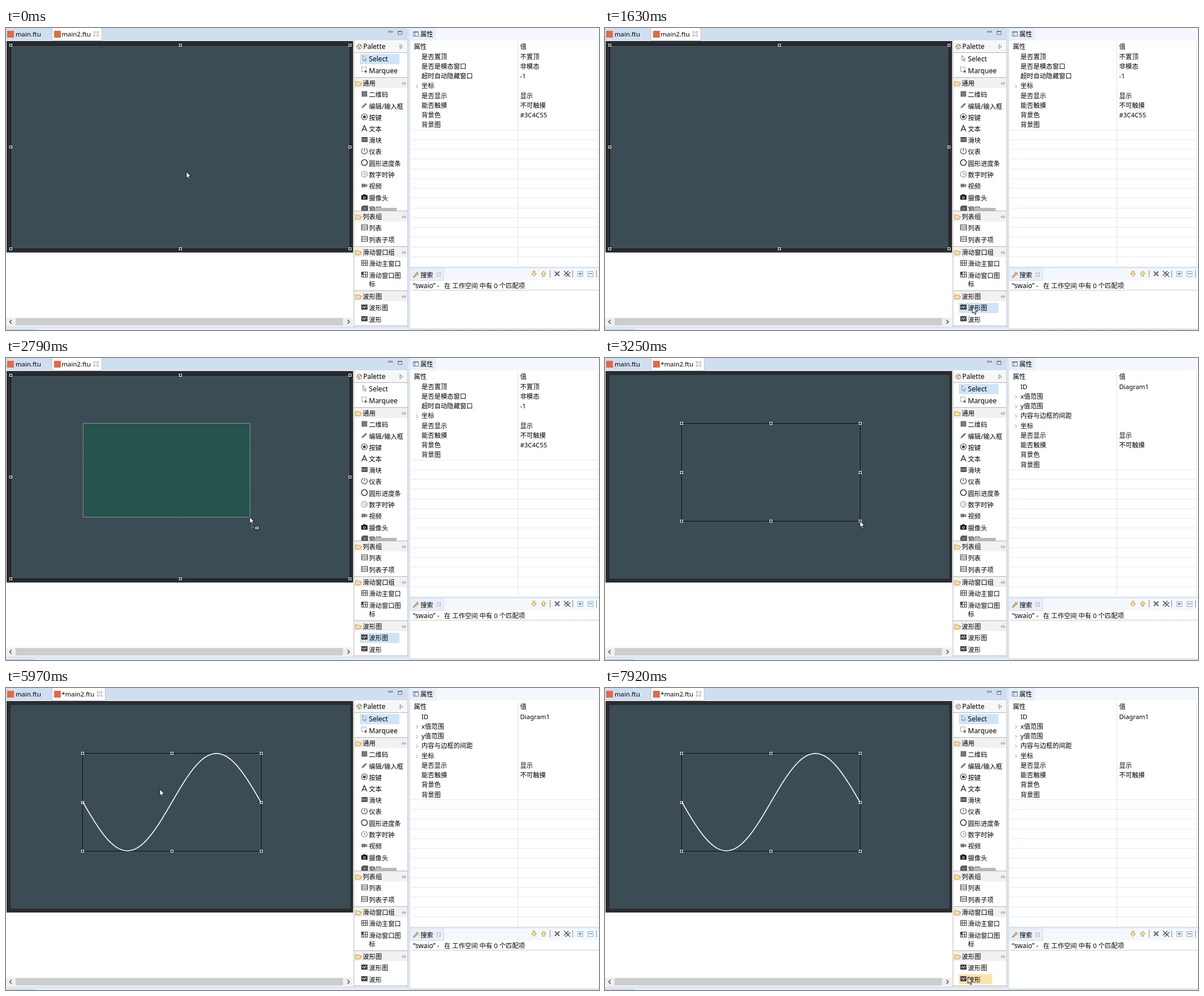
Write an HTML page with a canvas that moves like this. It is 1049 px wide and 534 px high and loops after 7990 ms.

```html
<!DOCTYPE html>
<html lang="zh">
<head>
<meta charset="utf-8">
<style>
html, body { margin: 0; width: 100%; height: 100%; overflow: hidden; background: #fff; }
canvas { display: block; }
</style>
</head>
<body>
<canvas id="stage" width="1049" height="534"></canvas>
<script>
const ctx = document.getElementById('stage').getContext('2d');
const LOOP = 7990;
const FAMILY = '"Noto Sans", "Noto Sans CJK SC", "Noto Sans CJK", sans-serif';
const BLUE = '#cfe4fa', ORANGE = '#fde2ae', INK = '#3c3c3c';
const HEADER = '#f4f8fe', TAB = '#e8eff9';

// Pointer moves: start, end, steps, target x, target y
const START = [319, 254];
const MOVES = [
  [360, 1140, 13, 627, 471],
  [1190, 1380, 4, 650, 493],
  [1695, 2410, 12, 136, 116],
  [2480, 2790, 6, 431, 281],
  [2855, 3000, 3, 451, 288],
  [3675, 4390, 11, 648, 519],
  [4460, 4580, 3, 652, 516],
  [5270, 5720, 8, 272, 179],
  [7280, 7790, 9, 600, 507],
  [7855, 7920, 2, 642, 511]
];
const DRAG = MOVES[3];

const smooth = s => s * s * (3 - 2 * s);
const easeOut = s => 1 - (1 - s) ** 2;

function pointerAt(t) {
  let [x, y] = START;
  for (const move of MOVES) {
    const [start, end, steps, toX, toY] = move;
    if (t < start) break;
    const k = Math.min(steps - 1, Math.floor((t - start) / (end - start) * (steps - 1) + 0.3));
    const s = (move === DRAG ? easeOut : smooth)((k + 1) / steps);
    x += (toX - x) * s;
    y += (toY - y) * s;
  }
  return [Math.round(x), Math.round(y)];
}

function box(x, y, w, h, color) {
  ctx.fillStyle = color;
  ctx.fillRect(x, y, w, h);
}

function frame(x, y, w, h, color, dash = []) {
  ctx.strokeStyle = color;
  ctx.lineWidth = 1;
  ctx.setLineDash(dash);
  ctx.strokeRect(x + 0.5, y + 0.5, w, h);
  ctx.setLineDash([]);
}

// y is the middle of the text row
function text(str, x, y, size = 11.35) {
  ctx.font = `${size}px ${FAMILY}`;
  ctx.fillStyle = '#000';
  ctx.fillText(str, x, y + 4.2);
}

function shape(path, x, y, fill, stroke, width = 1) {
  ctx.save();
  ctx.translate(x, y);
  const p = new Path2D(path);
  if (fill) { ctx.fillStyle = fill; ctx.fill(p); }
  if (stroke) { ctx.strokeStyle = stroke; ctx.lineWidth = width; ctx.stroke(p); }
  ctx.restore();
}

const CIRCLE = r => `M${r} 0A${r} ${r} 0 1 1 ${-r} 0A${r} ${r} 0 1 1 ${r} 0Z`;
const CROSS = 'M-4 -4L4 4M4 -4L-4 4';
const POINTER = 'M0 0V11.6L2.7 9.1L4.6 13.6L6.5 12.8L4.6 8.4H8.1Z';
const LIST = 'M-5 -4.5H5.5V4.5H-5ZM-5 -1.5H5.5M-5 1.5H5.5';
const WINDOW = 'M-5 -4.5H5.5V4.5H-5ZM-5 0H5.5M-2 -4.5V4.5M2 -4.5V4.5';

const DRAWERS = [['通用', 98], ['列表组', 334], ['滑动窗口组', 397], ['波形图', 475]];

// label, row middle, icon strokes, icon fill
const ITEMS = [
  ['二维码', 118, '', 'M-5 -5H5V5H-5Z', '#777'],
  ['编辑/输入框', 138.5, '', 'M-5 5L-4 1.5L2.5 -4.5L4.5 -2.5L-1.8 3.8Z', '#777'],
  ['按键', 158.5, CIRCLE(5.2), CIRCLE(2.6)],
  ['文本', 179, 'M-4.5 5L0 -5L4.5 5M-3 2H3'],
  ['滑块', 199, '', 'M-5 -4.5H5.5V4H-5Z'],
  ['仪表', 219, 'M-2.5 -4.5A5.2 5.2 0 1 0 2.5 -4.5M0 1V-5.5'],
  ['圆形进度条', 239.5, CIRCLE(5.2)],
  ['数字时钟', 260, CIRCLE(5) + 'M0 -3V0L2.5 1.5', '', '#888'],
  ['视频', 280, '', 'M-5 -3H2V-1L5 -3V3L2 1V3H-5Z', '#777'],
  ['摄像头', 300.5, '', 'M-5.5 -3.5H-2.5L-1.5 -5H1.5L2.5 -3.5H5.5V4.5H-5.5Z', '#111'],
  ['列表', 354, LIST],
  ['列表子项', 374.5, LIST],
  ['滑动主窗口', 417, WINDOW],
  ['滑动窗口图', 437.5, WINDOW, 'M-5 -4H-2V0H-5Z'],
  ['波形图', 495, '', 'M-5.5 -4.5H5.5V4.5H-5.5Z'],
  ['波形', 515.5, '', 'M-5.5 -4.5H5.5V4.5H-5.5Z']
];

// Selectable palette rows: x, y, width, height
const ROWS = {
  select: [626, 46, 70, 18],
  diagram: [626, 486, 70, 18],
  wave: [626, 506, 59, 18]
};

const WINDOW_PROPS = [
  ['是否置顶', '不置顶'], ['是否是模态窗口', '非模态'], ['超时自动隐藏窗口', '-1'], ['>坐标', ''],
  ['是否显示', '显示'], ['能否触摸', '不可触摸'], ['背景色', '#3C4C55'], ['背景图', '']
];
const DIAGRAM_PROPS = [
  ['ID', 'Diagram1'], ['>x值范围', ''], ['>y值范围', ''], ['>内容与边框的间距', ''], ['>坐标', ''],
  ['是否显示', '显示'], ['能否触摸', '不可触摸'], ['背景色', ''], ['背景图', '']
];

function drawTabs(edited) {
  box(0, 0, 711, 22, '#d0dff0');
  const right = edited ? 175 : 169;
  ctx.fillStyle = '#fff';
  ctx.beginPath();
  ctx.roundRect(81, 0, right - 81, 22, [3, 3, 0, 0]);
  ctx.fill();
  frame(81, -1, right - 81, 23, '#b9c9dd');
  for (const x of [2, 85]) box(x, 5, 12, 12, '#e26a45');
  text('main.ftu', 17, 11);
  text((edited ? '*' : '') + 'main2.ftu', 98.5, 11);
  shape('M-4 -4H-2L0 -2L2 -4H4V-2L2 0L4 2V4H2L0 2L-2 4H-4V2L-2 0L-4 -2Z', right - 9.5, 10.5, '#fff', '#777', 0.8);
  frame(676, 5, 7, 2, '#777');
  frame(693, 5, 7, 6, '#777');
  box(693, 5, 8, 2, '#777');
}

function selection(x, y, w, h) {
  frame(x, y, w, h, '#0c0f10');
  for (const u of [0, 0.5, 1]) for (const v of [0, 0.5, 1]) {
    if (u === 0.5 && v === 0.5) continue;
    const hx = Math.round(x + w * u), hy = Math.round(y + h * v);
    box(hx - 2, hy - 2, 5, 5, '#fff');
    box(hx - 1, hy - 1, 3, 3, '#222');
  }
}

function drawEditor(t, x, y) {
  box(1, 23, 613, 374, '#2b2c2f');
  box(8, 30, 601, 360, '#3c4c54');
  if (t < 3250) selection(8, 30, 600, 360);
  else selection(135, 115, 316, 173);
  if (t >= DRAG[0] && t < 3250) {
    box(136, 116, x - 136, y - 116, '#26534c');
    frame(136, 115, x - 136, y - 115, '#a9b8b5', [2, 1]);
  }
  if (t >= 5970) {
    ctx.beginPath();
    for (let px = 136; px <= 451; px++) ctx.lineTo(px, 201.8 + 86 * Math.sin((px - 136) / 315 * 2 * Math.PI));
    ctx.strokeStyle = '#fff';
    ctx.lineWidth = 1.6;
    ctx.stroke();
  }
  box(0, 512, 614, 15, '#f0f0f0');
  box(17, 513, 579, 13, '#cdcdcd');
  shape('M2 -3.5L-1.5 0L2 3.5', 8, 519.5, null, '#555', 1.5);
  shape('M-2 -3.5L1.5 0L-2 3.5', 606, 519.5, null, '#555', 1.5);
}

function drawHeader(label, y) {
  box(616, y - 10, 94, 18, '#f1f1f1');
  box(616, y - 11, 94, 1, '#b5b5b5');
  shape('M-4.5 4V-3.5H-1L0 -2H4V-0.5H6L4 4Z', 623, y, '#fbe3a0', '#c8933c');
  text(label, 631, y);
  shape('M-1 -2.5L-3.5 0L-1 2.5M1 -2.5L3.5 0L1 2.5M-3 0H3', 704, y, null, '#888', 0.9);
}

function drawPalette(t, x, y) {
  box(615, 22, 1, 506, '#b8b8b8');
  box(710, 22, 1, 506, '#c4cbd5');
  box(616, 24, 94, 19, '#f7f7f7');
  box(616, 43, 94, 1, '#b5b5b5');
  shape(CIRCLE(4.5), 625, 33, '#f4e7c6', '#8a8a7a');
  [['#d9573f', -2, -1], ['#4b8ed0', 2, -2], ['#58a55c', 0, 2]].forEach(([c, dx, dy]) => box(624 + dx, 32 + dy, 2, 2, c));
  text('Palette', 632, 33, 12);
  shape('M-2 -3.5L2.5 0L-2 3.5Z', 699, 33, null, '#777');

  const active = t >= 1630 && t < 3250 ? 'diagram' : t >= 4960 && t < 5970 ? 'wave' : 'select';
  for (const [name, [rx, ry, w, h]] of Object.entries(ROWS)) {
    const hover = x >= rx && x < rx + w && y >= ry && y < ry + h;
    if (name === active) box(rx, ry, w, h, BLUE);
    else if (hover) box(rx, ry, w, h, ORANGE);
  }
  shape('M0 0V9L2 7.2L3.7 10.5L5 10L3.5 6.6H6Z', 631.5, 48.5, '#fff', '#777', 0.9);
  text('Select', 642, 55, 12.1);
  ctx.setLineDash([2, 1.5]);
  shape('M-5 -5H3V3H-5Z', 634, 74, null, '#555');
  ctx.setLineDash([]);
  shape('M1 0V5.5L2.5 4.3H5Z', 634, 74, '#444');
  text('Marquee', 642, 75.5, 12);

  for (const [label, row] of DRAWERS) drawHeader(label, row);
  for (const [label, row, line, fill, color = INK] of ITEMS) {
    shape(line, 634, row - 1.5, null, color, label === '文本' || label === '圆形进度条' ? 1.6 : 1.1);
    if (fill) shape(fill, 634, row - 1.5, color);
    if (row > 490) shape('M-4 1L-2 -1.5L0 2L2 -2L4 0', 634, row - 1.5, null, '#fff');
    text(label, 642, row);
  }
  shape('M-3 -2.5V2M0 -2.5V2M3 -2.5V2', 634, 197.5, null, '#fff');
  shape(CIRCLE(1.8), 634, 299.8, null, '#fff');
  text('标', 642, 452.5);

  // Last row of the first drawer is cut off by its edge
  ctx.save();
  ctx.beginPath();
  ctx.rect(616, 312, 94, 11);
  ctx.clip();
  shape('M-3 -5H6V3H-3ZM-5 -3H4V5H-5Z', 634, 319.5, '#777', INK);
  text('窗口', 642, 320.5);
  box(652, 318, 39, 5, '#b9b9b9');
  ctx.restore();
  box(616, 526, 94, 1, '#b5b5b5');
}

function drawProperties(edited) {
  box(711, 0, 338, 534, '#dbe6f3');
  box(715, 0, 334, 422, '#fff');
  box(715, 0, 334, 22, HEADER);
  box(715, 0, 46, 22, TAB);
  frame(720, 6, 9, 8, '#5d7fa5');
  box(720, 6, 10, 2, '#5d7fa5');
  box(723, 8, 1, 7, '#5d7fa5');
  text('属性', 733, 11);
  text('属性', 721.5, 33);
  text('值', 909.5, 33);
  box(905, 24, 1, 396, '#e4e4e4');
  box(1046, 24, 1, 396, '#e4e4e4');

  const rows = edited ? DIAGRAM_PROPS : WINDOW_PROPS;
  rows.forEach(([name, value], i) => {
    const y = 50.5 + 17.25 * i;
    const nested = name[0] === '>';
    if (nested) shape('M-1.5 -3L1.5 0L-1.5 3', 727, y + 1, null, '#888');
    text(nested ? name.slice(1) : name, 735, y);
    text(value, 909.5, y);
  });
  for (let i = rows.length; i < 22; i++) box(717, Math.round(41.5 + 17.25 * i), 330, 1, '#e8e8e8');
}

function drawSearch() {
  box(715, 425, 334, 106, '#fff');
  box(715, 425, 334, 21, HEADER);
  box(715, 425, 59, 21, TAB);
  frame(714, 424, 60, 22, '#d3deec');
  shape('M-5 4L0 -1L2 -4.5L5 -1.5L1.5 1L-3.5 5.5Z', 725, 436, '#f3b46d', '#a3764a');
  text('搜索', 733, 436.5);
  shape('M-3 -3H-1.5L0 -1.5L1.5 -3H3V-1.5L1.5 0L3 1.5V3H1.5L0 1.5L-1.5 3H-3V1.5L-1.5 0L-3 -1.5Z', 765.5, 436, '#fff', '#888', 0.8);
  const arrow = 'M-1.8 -4.5H1.8V0H4.2L0 4.8L-4.2 0H-1.8Z';
  shape(arrow, 934, 434.5, '#fbe9ad', '#c48c24');
  ctx.save();
  ctx.translate(951, 434.5);
  ctx.scale(1, -1);
  shape(arrow, 0, 0, '#fbe9ad', '#c48c24');
  ctx.restore();
  for (const x of [962, 1002, 1044]) box(x, 428, 1, 13, '#888');
  shape(CROSS, 975, 434.5, null, '#666', 2.2);
  shape(CROSS, 991, 433.5, null, '#666', 1.7);
  shape(CROSS, 994, 436, null, '#666', 1.7);
  for (const x of [1011, 1029]) {
    frame(x, 430, 9, 9, '#8fb0cd');
    box(x + 2, 434, 6, 1, '#356c9c');
  }
  box(1015, 432, 1, 6, '#356c9c');
  text('“swaio” -', 720, 456, 11.8);
  text('在 工作空间 中有 0 个匹配项', 775, 456);
  box(717, 463, 332, 1, '#c9c9c9');
}

function drawPointer(t, x, y) {
  if (t >= 3610 && t < 3675) {
    shape('M-6 -6H-1.5L-3 -4.5L4.5 3L6 1.5V6H1.5L3 4.5L-4.5 -3L-6 -1.5Z', x, y, '#fff', '#000', 0.9);
    return;
  }
  shape(POINTER, x, y, '#fff', '#000', 0.9);
  const creating = (t >= 1630 && t < 3250) || (t >= 4960 && t < 5970);
  if (creating && x < 614) {
    ctx.setLineDash([1, 1]);
    shape('M3.5 14V18.5H10', x, y, null, '#bbb');
    ctx.setLineDash([]);
    box(x + 9, y + 16, 8, 7, '#000');
    box(x + 10, y + 17, 6, 5, '#fff');
    box(x + 11, y + 19, 4, 1, '#000');
    box(x + 12.5, y + 17.5, 1, 4, '#000');
  }
}

function draw(now) {
  const t = now % LOOP;
  const [x, y] = pointerAt(t);
  const edited = t >= 3250;
  box(0, 0, 1049, 534, '#fff');
  drawTabs(edited);
  drawEditor(t, x, y);
  drawPalette(t, x, y);
  drawProperties(edited);
  drawSearch();
  box(0, 528, 713, 1, '#c3cfde');
  box(0, 529, 713, 5, '#e4ecf6');
  box(0, 532, 52, 2, '#cbd8e8');
  drawPointer(t, x, y);
  requestAnimationFrame(() => draw(performance.now()));
}
draw(performance.now());
</script>
</body>
</html>
```
